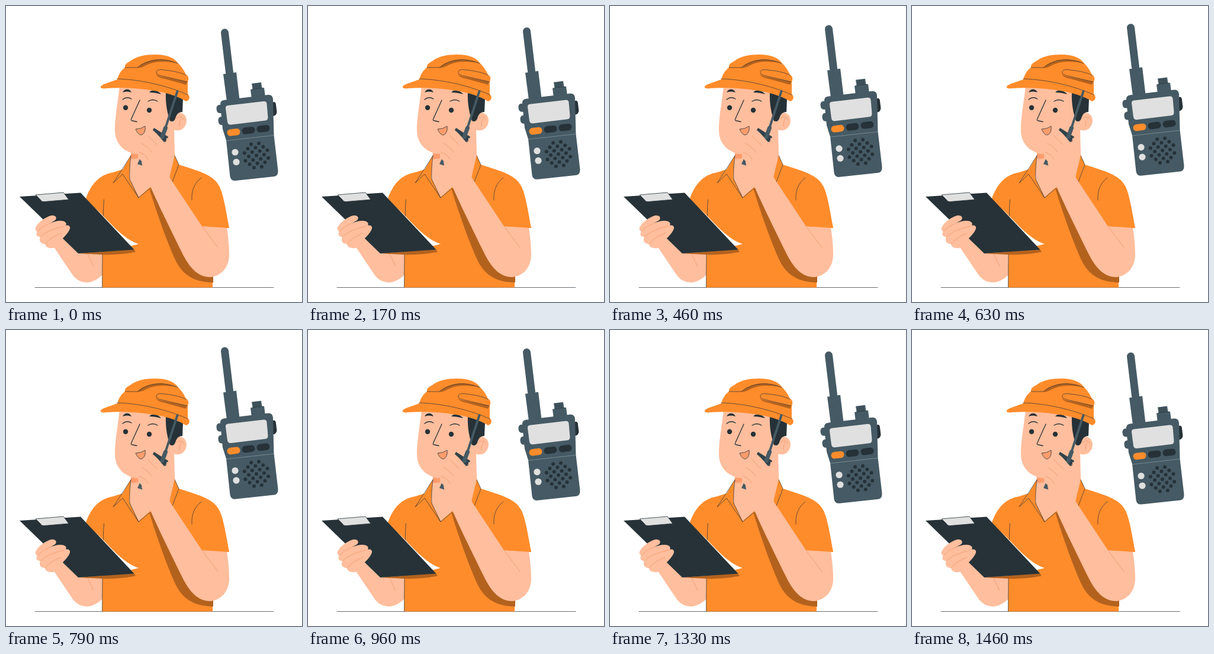
An HTML page that plays this animation: 500 px wide and 500 px high, repeating every 1500 ms.

```html
<!DOCTYPE html>
<html lang="en">
<head>
<meta charset="utf-8">
<title>Worker with a two-way radio</title>
<style>
  html, body { margin: 0; width: 100%; height: 100%; overflow: hidden; background: #fff; }
  svg { display: block; width: 100%; height: 100%; }
  .orange { fill: #ff8c2b; }
  .shade { fill: #b3621e; }
  .skin { fill: #ffbe9d; }
  .dark { fill: #263238; }
  .slate { fill: #455a64; }
  .light { fill: #e0e0e0; }
  .line { fill: none; stroke: #263238; stroke-width: .7; stroke-linecap: round; stroke-linejoin: round; }
  .crease { fill: none; stroke: #eb996e; stroke-width: .8; stroke-linecap: round; }
  .rod { fill: none; stroke: #455a64; stroke-linecap: round; }
</style>
</head>
<body>
<svg viewBox="0 0 500 500">
  <path class="line" d="M49 475.5H452"/>

  <!-- left forearm and shirt -->
  <path class="skin" d="M80 406L113 455C120 464 129 467 138 467C148 466 157 460 163 454V412L122 416L95 385Z"/>
  <path class="crease" d="M138 419L148 440"/>
  <path class="orange" d="M135 325C144 300 158 285 181 281L197 276L211 252L285 252L292 268C322 278 350 284 360 304C368 320 372 350 377 375L349 374V475.5H162.5L163 412L140 345Z"/>
  <path class="line" d="M165.500 327Q164 345 164.500 355M163 418L162.500 475M330 290C318 299 313 312 314 328"/>

  <!-- neck and collar -->
  <path class="skin" d="M211 246L208 290L224 323L246 304L286 252L280 240Z"/>
  <path fill="#ff9c6c" d="M211 249L223 250V257Q217 259 211 258Z"/>
  <path class="line" d="M211 253L181 299L197 284L224 324L209 293C208 275 210 262 211 253M224 324L243 308M285 253L292 268L281 297"/>

  <!-- head -->
  <path class="skin" d="M192 134C189 163 183 192 184 212C185 236 204 249 222 250L285 252L284 206L290 150L260 130Z"/>
  <path class="skin" d="M283 183C291 177 305 180 305 194C304 207 294 213 283 209Z"/>
  <path class="crease" d="M288 190C294 185 300 187 300 192M297 189C292 193 294 199 293 203"/>
  <path class="dark" d="M270 146L299 157L298 179C290 179 288 184 286 190C284 195 281 196 277 194C273 183 269 165 270 146Z"/>
  <path class="dark" d="M197 146C200 139 209 139 212 146Q204 143 197 146ZM242 146C246 140 257 142 262 149Q251 146 242 146Z"/>
  <path class="line" stroke-width="1.300" style="stroke-width:1.300" d="M197 158Q204 152 212 157M240 161Q248 156 256 161M226 159L212 190Q210 194 214 194L221 195.500"/>
  <circle class="dark" cx="202" cy="171.800" r="4.200"/>
  <circle class="dark" cx="242" cy="176" r="4.200"/>
  <path fill="#ff9c6c" stroke="#263238" stroke-width=".8" d="M219 208Q228 208 235 203C236 211 233 217 228 218C224 217 221 213 219 208Z"/>

  <!-- helmet -->
  <path class="orange" d="M160 136C162 132 175 129 188 124C190 115 196 107 201 104C200 98 205 96 210 93C220 85 235 82 252 82C272 82 285 88 290 96C297 103 301 109 304 116C309 118 309 124 307 128V149C312 153 310 160 304 161C290 152 270 146 250 143C225 139 195 137 170 139C163 140 159 139 160 136Z"/>
  <path class="shade" d="M221 105C235 91 262 84 290 97C262 91 245 95 233 102Q227 105 221 105ZM253 113C255 119 262 119 272 121L306 128L304 133L268 123C258 121 254 119 253 113Z"/>
  <path class="line" d="M188 123C225 124 272 134 307 150M201 104L222 104C236 92 262 85 290 97M306 128L263 118C251 116 251 107 262 107.500C278 109 296 112 304 117"/>

  <!-- handset, hand and right arm -->
  <path class="slate" d="M250 206L274 221L238 272L222 267Z"/>
  <path class="dark" d="M250 206L274 221L271 231L244 216Z" opacity=".6"/>
  <path class="rod" stroke-width="4" d="M289.500 144L270 204"/>
  <path class="rod" stroke-width="7" d="M269.500 206L264 221"/>
  <path class="shade" d="M242 308C257 357 274 403 287 431C301 459 325 467 350 467V454L298 410L248 308Z"/>
  <path class="skin" d="M236 285C247 315 272 365 297 416C310 443 325 458 345 458C365 456 377 440 377 420C377 402 375 388 373 374L331 372L276 289Z"/>
  <path class="skin" d="M240 219C237 212 242 206 248 210C254 214 262 224 267 230C272 231 271 226 271 223C278 224 285 235 285 248C284 262 278 276 276 293L242 303C237 287 229 271 229 262C223 257 222 251 225 247C221 241 223 234 229 232C227 225 233 219 240 219Z"/>
  <path class="crease" d="M240 219Q249 229 255 234M229 232Q240 238 246 247M225 247Q235 250 240 259M331 372L358 408"/>
  <path class="orange" d="M318 351L360 304C368 320 372 350 377 375L332 372Z"/>

  <!-- clipboard -->
  <path fill="#fff" d="M150 340C175 365 198 394 224 402L208 406Z"/>
  <path class="shade" d="M122 418L216 411L219 415.500Q190 421 163 420Z"/>
  <path class="dark" d="M23 322L126 315.500L216.500 411.500L122 418Z"/>
  <path class="light" stroke="#263238" stroke-width=".8" d="M50 319L97 315L106 327L65 330.500Q60 331 58 327Z"/>
  <path class="skin" d="M50 374C54 365 68 356 76 354C84 353 87 358 83 362L72 368C82 363 95 361 100 365C103 368 102 371 98 372C104 369 109 371 108 376C105 385 95 392 90 400C86 406 82 410 75 409C68 408 66 405 66 402C58 402 55 396 58 390C51 390 50 385 53 381C50 380 49 377 50 374Z"/>
  <path class="crease" d="M53 381Q61 372 72 368M58 390Q70 378 98 372M66 402Q76 390 93 384"/>

  <!-- floating radio -->
  <g id="radio">
    <path class="rod" stroke-width="13" d="M369.500 45L377.500 112"/>
    <path class="slate" d="M367 115L389 112L394.500 158L373 161ZM415 131L431 129L432.500 138.500L436 138L438 154L415 157L413 141L416.500 140.500Z"/>
    <path class="line" d="M418.500 132L419.500 139M421.500 131.500L422.500 138.500M424.500 131L425.500 138M427.500 131L428.500 138M416 140.500L433 138.500"/>
    <path class="dark" d="M448 163L453 162Q456 163 456 167L457.500 179Q457 185 451 186Z"/>
    <path class="slate" d="M363 167H360Q355 168 355.500 174Q356 181 361 181H366ZM366 187H363Q358 188 358.500 194Q359 201 364 201H369Z"/>
    <path class="slate" d="M362 168Q361 160 368 159L443 150Q450 149.500 451 157L452.500 218L459.500 278Q460 287 453 288L388 295Q380 296 378.500 288L372 227L366 208Z"/>
    <path fill="none" stroke="#8fa0a8" stroke-width=".7" d="M372 227.500L452.500 218.500"/>
    <path class="light" d="M371 173Q370.500 168.500 375 168L435 161Q440 160.500 440.500 165L442.500 188Q442.500 193 438 193.500L380 200.500Q375 201 374 196Z"/>
    <circle class="light" cx="387" cy="247" r="5.600"/>
    <circle class="light" cx="389" cy="263.500" r="5.600"/>
  </g>
</svg>
<script>
  const radio = document.getElementById('radio');

  function add(tag, attrs) {
    const node = document.createElementNS('http://www.w3.org/2000/svg', tag);
    for (const key in attrs) node.setAttribute(key, attrs[key]);
    radio.append(node);
  }

  // Buttons
  ['orange', 'dark', 'dark'].forEach((color, i) => add('rect', {
    class: color, x: -11, y: -5.7, width: 22, height: 11.4, rx: 5.5,
    transform: `translate(${384.5 + 25 * i} ${213.3 - 3 * i}) rotate(-7)`
  }));

  // Staggered speaker holes
  [2, 3, 4, 3, 4, 3, 2].forEach((count, i) => {
    const row = i - 3;
    for (let j = 0; j < count; j++) {
      const col = j - (count - 1) / 2;
      add('circle', {
        class: 'dark', r: 3,
        cx: 423 + 12.9 * col + 0.8 * row,
        cy: 252.5 - 1.6 * col + 6.6 * row
      });
    }
  });

  const LOOP = 1500, RISE = 10;
  const start = performance.now();

  function draw() {
    const phase = (performance.now() - start) % LOOP / LOOP;
    const lift = RISE * (1 - Math.abs(1 - 2 * phase));
    radio.setAttribute('transform', `translate(0 ${-lift})`);
    requestAnimationFrame(draw);
  }
  draw();
</script>
</body>
</html>
```
